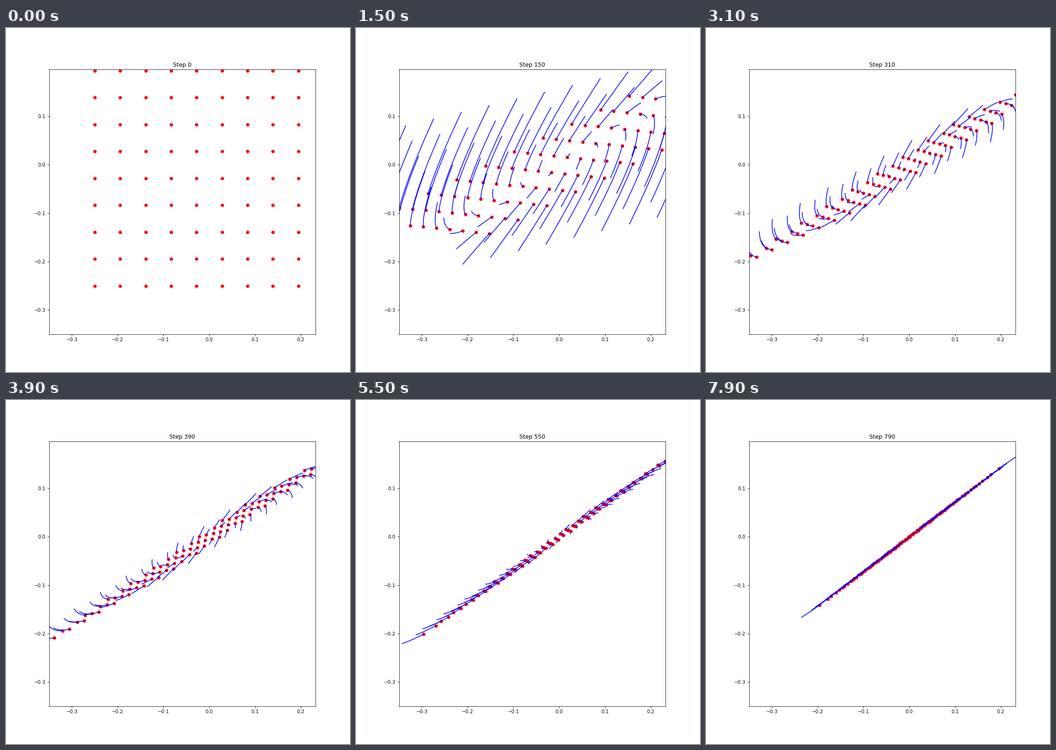
A matplotlib script for the animation above (8 s loop, 748 px wide and 748 px high).

```python
import numpy as np
import matplotlib.pyplot as plt
from matplotlib.animation import FuncAnimation

STEPS = 1000
STRIDE = 10
TRAIL = 100
FRAMES = 80

# Linear system x' = Ax, solved exactly through its eigenvectors
A = np.array([[0.25, -0.6], [0.6, -1.0]])
rates, modes = np.linalg.eig(A)

axis_points = np.linspace(-0.25, 0.25, 10)
starts = np.array([g.ravel() for g in np.meshgrid(axis_points, axis_points)])
weights = np.linalg.solve(modes, starts)
times = np.arange(STEPS + 1) * 0.01
growth = np.exp(np.outer(times, rates))
xs, ys = np.einsum("dm,tm,mp->dtp", modes, growth, weights)

fig, ax = plt.subplots(figsize=(10, 10), dpi=74.8)
ax.set_xlim(-0.35, xs[-1].max() + 0.1)
ax.set_ylim(-0.35, ys[-1].max() + 0.1)
title = ax.set_title("Step 0")
dots, = ax.plot([], [], "ro")
trails = [ax.plot([], [], "b-")[0] for _ in range(xs.shape[1])]


def update(frame):
    step = frame * STRIDE
    window = slice(max(0, step - TRAIL), step + 1)
    title.set_text(f"Step {step}")
    dots.set_data(xs[step], ys[step])
    for k, trail in enumerate(trails):
        # A lone starting point has no trail yet
        trail.set_data(xs[window, k], ys[window, k])
        trail.set_visible(step > 0)
    return [title, dots, *trails]


anim = FuncAnimation(fig, update, frames=FRAMES, interval=100,
                     repeat=True, repeat_delay=0, blit=False)
plt.show()
```
